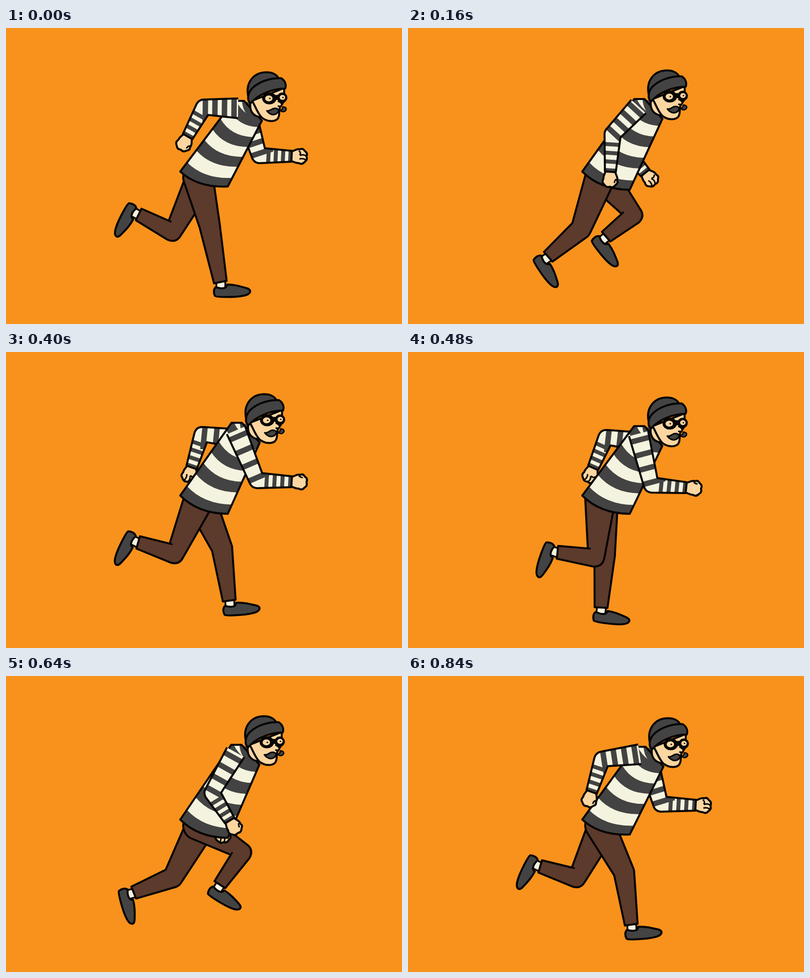
These frames come from a looping animation (800 by 600 pixels, 880 ms). An HTML page with a canvas:

```html
<!DOCTYPE html>
<html lang="en">
<head>
<meta charset="utf-8">
<title>Running burglar</title>
<style>
  html, body { margin: 0; height: 100%; overflow: hidden; background: #f9921c; }
  canvas { display: block; }
</style>
</head>
<body>
<canvas id="stage" width="800" height="600"></canvas>
<script>
const ctx = document.getElementById('stage').getContext('2d');
const LOOP = 880, STEP = 40;
const DARK = '#434343', CREAM = '#f4f3df', SKIN = '#fcd6a1', BROWN = '#5c3a2c', INK = '#060404';

// time, knee x y, ankle x y, foot angle
const LEG = [
  [0, 411, 400, 433, 515, 0],
  [40, 397, 412, 390, 518, 8],
  [80, 380, 405, 345, 509, 20],
  [200, 336, 408, 258, 439, 75],
  [240, 337, 405, 255, 410, 90],
  [400, 339, 407, 267, 386, 117],
  [440, 335, 410, 268, 378, 118],
  [480, 376, 414, 302, 406, 110],
  [520, 407, 419, 336, 419, 93],
  [640, 474, 358, 432, 423, 32],
  [680, 499, 345, 463, 418, 12],
  [760, 483, 366, 503, 468, -12],
  [840, 436, 398, 451, 504, -3]
];
// time, elbow x y, wrist x y
const ARM = [
  [0, 400, 162, 367, 220],
  [40, 397, 176, 370, 236],
  [80, 396, 189, 369, 255],
  [200, 425, 228, 432, 308],
  [240, 441, 237, 462, 315],
  [400, 508, 259, 577, 263],
  [440, 509, 258, 573, 261],
  [480, 493, 268, 562, 275],
  [520, 486, 263, 531, 285],
  [640, 418, 237, 452, 293],
  [840, 393, 170, 371, 235]
];

// smooth periodic interpolation through the keys
function pose(keys, time) {
  const t = time % LOOP, n = keys.length;
  const key = i => keys[(i + n) % n];
  const at = i => key(i)[0] + LOOP * Math.floor(i / n);
  let i = n - 1;
  while (keys[i][0] > t) i--;
  const span = at(i + 1) - at(i), s = (t - at(i)) / span;
  const slope = (j, c) => (key(j + 1)[c] - key(j - 1)[c]) / (at(j + 1) - at(j - 1)) * span;
  return keys[0].slice(1).map((_, k) => {
    const c = k + 1, a = key(i)[c], b = key(i + 1)[c];
    return a + s * slope(i, c)
      + s * s * (3 * (b - a) - 2 * slope(i, c) - slope(i + 1, c))
      + s * s * s * (2 * (a - b) + slope(i, c) + slope(i + 1, c));
  });
}

const add = (p, d, k = 1) => [p[0] + d[0] * k, p[1] + d[1] * k];
const mix = (p, q, t) => [p[0] + (q[0] - p[0]) * t, p[1] + (q[1] - p[1]) * t];
const unit = ([x, y]) => { const l = Math.hypot(x, y) || 1; return [x / l, y / l]; };
const toward = (p, q) => unit([q[0] - p[0], q[1] - p[1]]);
const angle = ([x, y]) => Math.atan2(y, x);

function shape(path, fill, width = 4) {
  const p = typeof path === 'string' ? new Path2D(path) : path;
  if (fill) { ctx.fillStyle = fill; ctx.fill(p); }
  if (width) { ctx.lineWidth = width; ctx.strokeStyle = INK; ctx.stroke(p); }
}

function place([x, y], turn, draw) {
  ctx.save();
  ctx.translate(x, y);
  ctx.rotate(turn);
  draw();
  ctx.restore();
}

// tapered two-bone limb; side is the direction the joint points
function limb(top, joint, end, [w0, w1, w2], side, capped) {
  const u = toward(top, joint), v = toward(joint, end);
  const nu = [u[1] * side, -u[0] * side], nv = [v[1] * side, -v[0] * side];
  const bis = unit(add(nu, nv));
  const reach = w1 * Math.min(1.35, 1 / Math.max(.1, bis[0] * nu[0] + bis[1] * nu[1]));
  const crease = add(joint, bis, -w1 * .97);
  const path = new Path2D();
  path.moveTo(...add(top, nu, w0));
  path.lineTo(...add(joint, nu, w1));
  path.quadraticCurveTo(...add(joint, bis, reach), ...add(joint, nv, w1));
  path.lineTo(...add(end, nv, w2));
  path.lineTo(...add(end, nv, -w2));
  path.lineTo(...crease);
  path.lineTo(...add(top, nu, -w0));
  if (capped) path.arc(...top, w0, angle(u) + Math.PI / 2, angle(u) + Math.PI * 1.5);
  return { path, u, v, crease, bend: u[0] * v[0] + u[1] * v[1] };
}

function leg(time, hip) {
  const [kx, ky, ax, ay, turn] = pose(LEG, time), ankle = [ax, ay];
  place(ankle, turn * Math.PI / 180, () => {
    shape('M-8,-4 L10,-4 L10,13 L-8,13 Z', CREAM, 3.5);
    shape('M-9,10 C-14,14 -14,22 -11,28 C-9,31 30,31 45,28 C63,25 65,15 52,12 C38,8 28,5 14,5 C13,9 12,11 8,12 Q0,14 -9,10 Z', DARK);
  });
  const l = limb(hip, [kx, ky], ankle, [30, 21, 13], 1, true);
  shape(l.path, BROWN);
  if (l.bend < .6) {
    const [x, y] = l.crease, [sx, sy] = add(l.crease, l.v, -6);
    shape(`M${x},${y} L${sx},${sy}`, null, 3.5);
  }
}

function bands(from, to, dir, marks, width, half) {
  const n = [dir[1], -dir[0]];
  ctx.strokeStyle = DARK;
  ctx.lineWidth = width;
  for (const t of marks) {
    const c = mix(from, to, t);
    ctx.beginPath();
    ctx.moveTo(...add(c, n, half));
    ctx.lineTo(...add(c, n, -half));
    ctx.stroke();
  }
}

function arm(time, shoulder, [dx, dy], fingers) {
  const [ex, ey, wx, wy] = pose(ARM, time);
  const elbow = [ex + dx, ey + dy], wrist = [wx + dx, wy + dy];
  const l = limb(shoulder, elbow, wrist, [20, 17, 11], -1);
  place(wrist, angle(l.v), () => {
    shape('M-3,-9 C5,-10 8,-17 17,-15 Q22,-18 26,-12 Q33,-8 30,-1 Q33,6 27,10 Q22,17 15,13 C8,14 4,10 -3,9 Z', SKIN);
    shape(fingers ? 'M30,-2 Q22,-6 17,-2 M29,6 Q22,2 16,5 M14,-12 Q20,-8 16,-3' : 'M14,-13 Q18,-9 22,-10', null, 3);
  });
  ctx.save();
  ctx.clip(l.path);
  ctx.fillStyle = CREAM;
  ctx.fill(l.path);
  bands(shoulder, elbow, l.u, [.12, .4, .68, .96], 11, 28);
  bands(elbow, wrist, l.v, [.27, .5, .73, .96], 8, 26);
  ctx.restore();
  shape(l.path);
}

function torso(d, hemY) {
  const S = add([460, 146], d), C = add([517, 186], d), N = add([481, 146], d);
  const hemL = [352, 291], hemR = [448, hemY];
  const sag = (p, q) => add(mix(p, q, .5), [-12, 18]);
  const body = new Path2D();
  body.moveTo(...S);
  body.lineTo(...hemL);
  body.quadraticCurveTo(...sag(hemL, hemR), ...hemR);
  body.lineTo(...C);
  body.lineTo(...N);
  body.closePath();
  shape(body, CREAM, 0);
  ctx.save();
  ctx.clip(body);
  ctx.fillStyle = DARK;
  for (const [low, high] of [[-.1, .13], [.3, .45], [.6, .75], [.9, 1.03]]) {
    const a = mix(hemL, S, low), b = mix(hemR, C, low), c = mix(hemR, C, high), e = mix(hemL, S, high);
    ctx.beginPath();
    ctx.moveTo(...a);
    ctx.quadraticCurveTo(...sag(a, b), ...b);
    ctx.lineTo(...c);
    ctx.quadraticCurveTo(...sag(e, c), ...e);
    ctx.fill();
  }
  ctx.restore();
  place(d, 0, () => shape('M477,146 C477,166 492,188 517,187 L513,176 L494,150 Z', DARK, 0));
  shape(body);
}

function ellipse(x, y, rx, ry, fill) {
  ctx.fillStyle = fill;
  ctx.beginPath();
  ctx.ellipse(x, y, rx, ry, 0, 0, 7);
  ctx.fill();
}

function head() {
  shape('M494,148 C491,165 498,177 514,179 L530,180 L525,150 Z', SKIN);
  shape('M497,146 C502,152 507,170 517,180 C527,188 541,189 548,183 Q552,179 552,170 L553,160 L562,146 L562,120 Z', SKIN);
  ellipse(532, 141, 14.5, 12, INK);
  ellipse(558, 139.5, 10.5, 10.5, INK);
  ctx.fillStyle = INK;
  ctx.fillRect(540, 134, 14, 10);
  ellipse(531, 141, 7.5, 6, SKIN);
  ellipse(558.5, 139, 5.5, 5, SKIN);
  ellipse(533, 141, 1.6, 1.6, INK);
  ellipse(559.5, 139, 1.5, 1.5, INK);
  shape('M549,146 Q560,151 556,156 Q553,158 549,156', SKIN, 3);
  shape('M527,166 C534,168 536,161 543,161 Q549,161 551,165 Q549,173 540,174 Q532,173 527,166 Z', DARK, 3);
  shape('M552,164 Q559,166 559,158 Q567,158 566,164 Q561,172 552,164 Z', DARK, 2.5);
  shape('M489,135 C484,108 501,88 526,88 C540,88 549,94 552,103 L530,125 Z', DARK);
  shape('M494,151 C486,144 488,129 499,119 C513,106 536,99 556,100 C564,105 567,114 564,121 C540,121 510,132 494,151 Z', DARK);
}

function draw(t) {
  const wave = (period, peak) => Math.cos(2 * Math.PI * (t - peak) / period);
  const sway = [-3.5 + 1.8 * wave(880, 0) + 2 * wave(440, 40), -3.3 + 8 * wave(440, 62)];
  const hemY = 328 - 7 * Math.max(0, wave(880, -20)) ** 4;
  ctx.fillStyle = '#f9921c';
  ctx.fillRect(0, 0, 800, 600);
  ctx.lineJoin = 'round';
  ctx.lineCap = 'butt';
  leg(t + LOOP / 2, [394, 303]);
  leg(t, [388, 303]);
  arm(t + LOOP / 2, add([488, 180], sway), [4, -1], true);
  torso(sway, hemY);
  place(sway, 0, head);
  arm(t, add([469, 161], sway), [0, 0], false);
}

const start = performance.now();
function tick() {
  draw(Math.floor((performance.now() - start) / STEP) * STEP % LOOP);
  requestAnimationFrame(tick);
}
tick();
</script>
</body>
</html>
```
